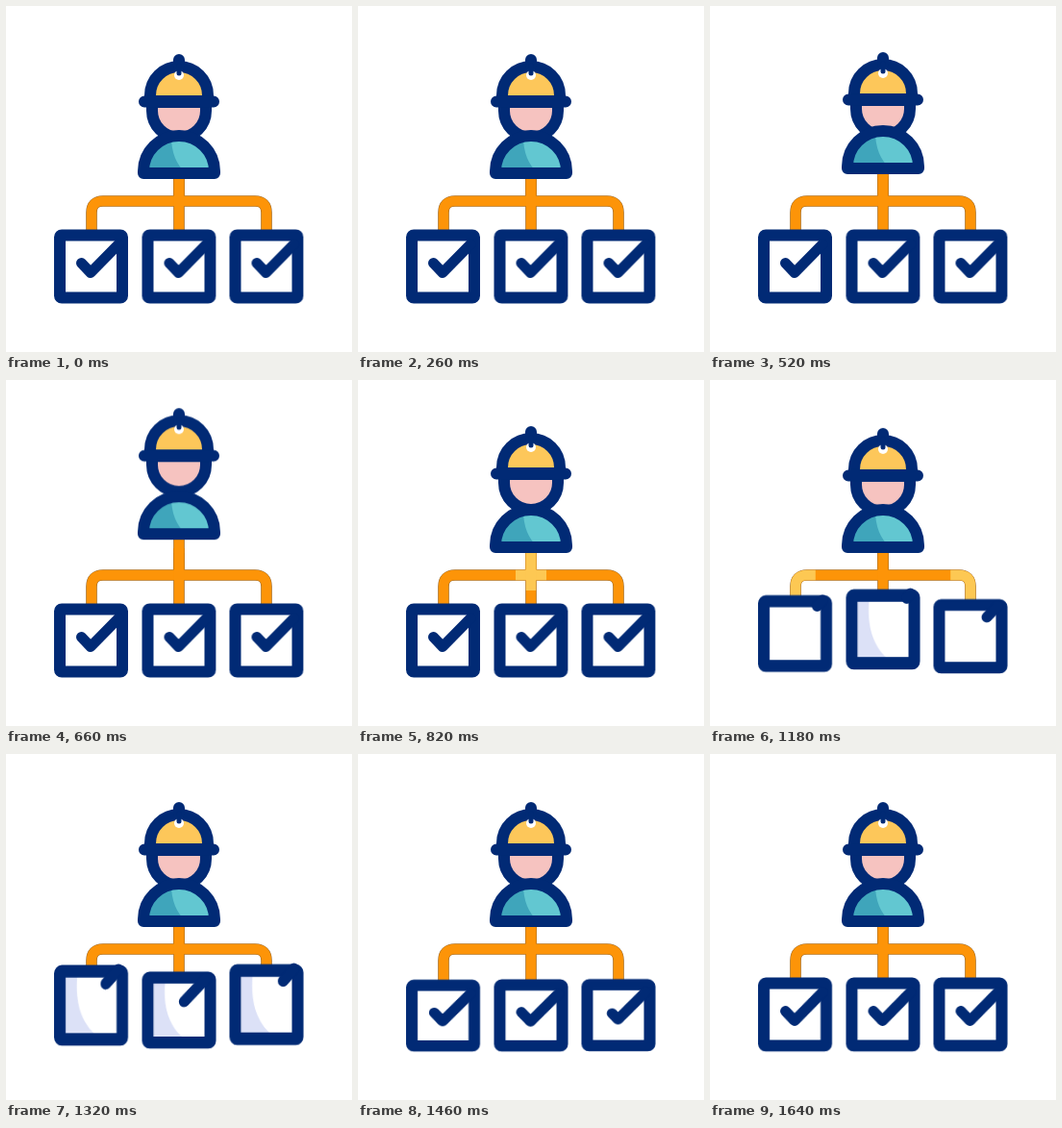
Write an HTML page without scripts that moves like this. It is 360 px wide and 360 px high and loops after 2 s.

```html
<!DOCTYPE html>
<html lang="en">
<head>
<meta charset="utf-8">
<title>Task delegation</title>
<style>
  html, body { margin: 0; width: 100%; height: 100%; overflow: hidden; background: #fff; }
  svg { display: block; width: 100vw; height: 100vh; }

  .ink { stroke: #012a75; stroke-width: 12; stroke-linecap: round; stroke-linejoin: round; }
  .wire { fill: none; stroke: #fd9408; stroke-width: 10.4; }
  .edge { stroke: #9b6a2c; stroke-width: 11.6; }
  .signal { stroke: #fdc853; stroke-dasharray: 120 400; stroke-dashoffset: 120; }

  .head, .body, .signal { animation: 2s ease-in-out infinite; }
  .head { animation-name: head; }
  .body { animation-name: body; }
  .signal { animation-name: signal; animation-timing-function: linear; }

  .box, .shine, .check { animation: 2s ease-in-out infinite; animation-delay: var(--lag, 0ms); }
  .box { animation-name: box; transform-origin: 0 310px; }
  .shine { animation-name: shine; opacity: 0; }
  .check { animation-name: check; fill: none; stroke-width: 11; stroke-dasharray: 100 200; }

  @keyframes head {
    0%, 13% { transform: none; }
    26% { transform: translateY(-2px); }
    32.5% { transform: translateY(-21px); }
    39%, 41% { transform: translateY(-2px); }
    46% { transform: translateY(-9px); }
    51% { transform: translateY(-4px); }
    60%, 100% { transform: none; }
  }
  @keyframes body {
    0%, 13% { transform: none; }
    26% { transform: translateY(-5px); }
    32.5% { transform: translateY(-14px); }
    39%, 41% { transform: none; }
    46% { transform: translateY(-4px); }
    51% { transform: translateY(-1px); }
    60%, 100% { transform: none; }
  }
  @keyframes signal {
    0%, 36.5% { stroke-dashoffset: 120; }
    64.4%, 100% { stroke-dashoffset: -150; }
  }
  @keyframes box {
    0%, 46% { transform: translateY(0) scaleY(1); }
    51% { transform: translateY(0) scaleY(.93); }
    53.5% { transform: translateY(0) scaleY(.92); }
    63% { transform: translateY(-9px) scaleY(1.1); }
    66% { transform: translateY(-6px) scaleY(1.09); }
    68% { transform: translateY(-3px) scaleY(1.04); }
    73% { transform: translateY(0) scaleY(.97); }
    80%, 100% { transform: translateY(0) scaleY(1); }
  }
  @keyframes shine {
    0%, 59% { opacity: 0; }
    61%, 69% { opacity: 1; }
    71%, 100% { opacity: 0; }
  }
  @keyframes check {
    0%, 54% { stroke-dashoffset: 0; transform: none; }
    60%, 63% { stroke-dashoffset: 90; transform: translateY(-11px); }
    66% { stroke-dashoffset: 66; transform: translateY(-11px); }
    68% { stroke-dashoffset: 40; transform: translateY(-9px); }
    74%, 100% { stroke-dashoffset: 0; transform: none; }
  }
</style>
</head>
<body>
<svg viewBox="0 0 360 360">
  <defs>
    <rect id="frame" x="56" y="238.5" width="65" height="65" rx="2"/>
    <path id="crescent" d="M62 244H74C72 268 78 286 92 298H62Z"/>
    <path id="tick" pathLength="100" d="M117 248L88 277.5L78.5 267.5"/>
    <g id="wires">
      <path d="M180 175V203H101Q89 203 89 215V240"/>
      <path d="M180 175V203H259Q271 203 271 215V240"/>
      <path d="M180 175V240"/>
    </g>
    <path id="torso" d="M143 174V172A37 37 0 0 1 217 172V174Z"/>
  </defs>

  <g class="wire">
    <path class="edge" d="M180 155V180"/>
    <use class="edge" href="#wires"/>
    <path d="M180 155V180"/>
    <use href="#wires"/>
    <use class="signal" href="#wires"/>
  </g>

  <g>
    <g class="box">
      <use href="#frame" fill="#fff"/>
      <use class="shine" href="#crescent" fill="#dce1f7"/>
      <use class="ink" href="#frame" fill="none"/>
      <use class="ink check" href="#tick"/>
    </g>
  </g>
  <g transform="translate(91.5)" style="--lag:-40ms">
    <g class="box">
      <use href="#frame" fill="#fff"/>
      <use class="shine" href="#crescent" fill="#dce1f7"/>
      <use class="ink" href="#frame" fill="none"/>
      <use class="ink check" href="#tick"/>
    </g>
  </g>
  <g transform="translate(182.5)" style="--lag:20ms">
    <g class="box">
      <use href="#frame" fill="#fff"/>
      <use class="shine" href="#crescent" fill="#dce1f7"/>
      <use class="ink" href="#frame" fill="none"/>
      <use class="ink check" href="#tick"/>
    </g>
  </g>

  <g class="head">
    <path class="ink" d="M152 100V109A28 28 0 0 0 208 109V100Z" fill="#f6c3c0"/>
    <path class="ink" d="M150 99V93A30 30 0 0 1 210 93V99Z" fill="#fdc75a"/>
    <circle cx="180" cy="72" r="5" fill="#fff"/>
    <path class="ink" d="M180 56V62M144 99.5H216" fill="none"/>
    <path class="ink" d="M180 62V70" style="stroke-width:5"/>
  </g>

  <g class="body">
    <use href="#torso" fill="#62c7d1"/>
    <path d="M143 174V172A37 37 0 0 1 172 136Q172 160 187 174Z" fill="#3fa5bb"/>
    <use class="ink" href="#torso" fill="none"/>
  </g>
</svg>
</body>
</html>
```
